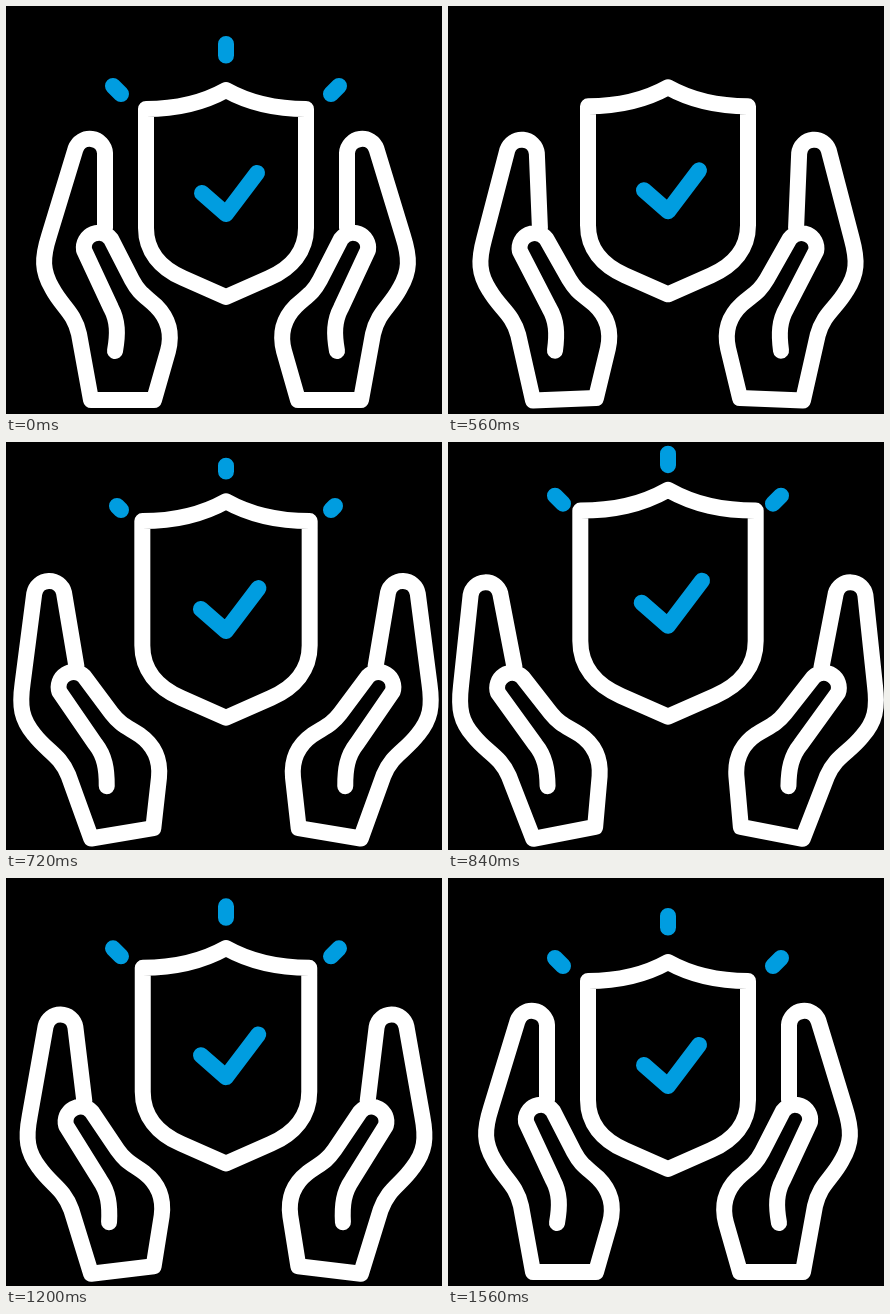
These frames come from a looping animation (436 px wide and 408 px high, 1680 ms). An HTML page:

```html
<!DOCTYPE html>
<html lang="en">
<head>
<meta charset="utf-8">
<title>Protected shield</title>
<style>
  html, body { margin: 0; height: 100%; overflow: hidden; background: #000; }
  svg { display: block; width: 100vw; height: 100vh; }
  path {
    fill: none; stroke: #fff; stroke-width: 16; stroke-linecap: round; stroke-linejoin: round;
    vector-effect: non-scaling-stroke;
  }
  .blue { stroke: #009de0; }
</style>
</head>
<body>
<svg viewBox="0 0 436 408">
  <defs>
    <path id="hand" d="M99 222V147A15.2 15.2 0 0 0 69.5 143L43 230C36 252 36 265 46 282C56 301 68 306 73 328L85 394H148L162 345C167 326 162 312 150 300C138 289 133 287 126 274L105 233A15 15 0 0 0 78 244L105 302C112 315 112 328 109 345"/>
  </defs>
  <use class="hand" href="#hand"/>
  <g transform="matrix(-1 0 0 1 440 0)"><use class="hand" href="#hand"/></g>
  <g id="shield">
    <path d="M220 84C195 98 170 103 140 103V222C140 245 154 262 177 272L220 291L263 272C286 262 300 245 300 222V103C270 103 245 98 220 84Z"/>
    <path class="blue" d="M196 187L220 208L251 167"/>
  </g>
  <path id="rays" class="blue"/>
</svg>
<script>
const LOOP = 1680, STEP = 40, LAST = 1560;
const hands = document.querySelectorAll('.hand');
const shield = document.getElementById('shield');
const rays = document.getElementById('rays');

// Each ray: inner end, then outer end.
const RAYS = [[220, 49.5, 220, 38], [115, 88, 107, 80], [325, 88, 333, 80]];

const progress = (t, from, to) => Math.min(1, Math.max(0, (t - from) / (to - from)));
const ease = (t, from, to) => {
  const u = progress(t, from, to);
  return u * u * (3 - 2 * u);
};
const outAndBack = (t, a, b, c, d) => ease(t, a, b) - ease(t, c, d);

function rayPath(start, end, lift) {
  if (end - start < 0.01) return '';
  return RAYS.map(([x1, y1, x2, y2]) => {
    const at = k => `${x1 + (x2 - x1) * k} ${y1 + (y2 - y1) * k - lift}`;
    return `M${at(start)}L${at(end)}`;
  }).join('');
}

function draw(t) {
  const angle = -10.9 * outAndBack(t, 460, 793, 970, 1530);
  const lift = 26.3 * outAndBack(t, 495, 825, 1000, 1340);
  const scale = 1 + 0.11 * outAndBack(t, 560, 920, 1000, 1340);

  hands.forEach(hand => hand.setAttribute('transform', `rotate(${angle} 100 394)`));
  shield.setAttribute('transform',
    `translate(220 ${187.5 - lift}) scale(${scale}) translate(-220 -187.5)`);

  // Rays leave outwards, then grow back from the shield.
  const [start, end] = t < 500 ? [ease(t, 0, 400), 1] : [0, ease(t, 600, 840)];
  rays.setAttribute('d', rayPath(start, end, lift));
}

function tick() {
  const t = performance.now() % LOOP;
  draw(Math.min(LAST, Math.floor(t / STEP) * STEP));
  requestAnimationFrame(tick);
}
tick();
</script>
</body>
</html>
```
